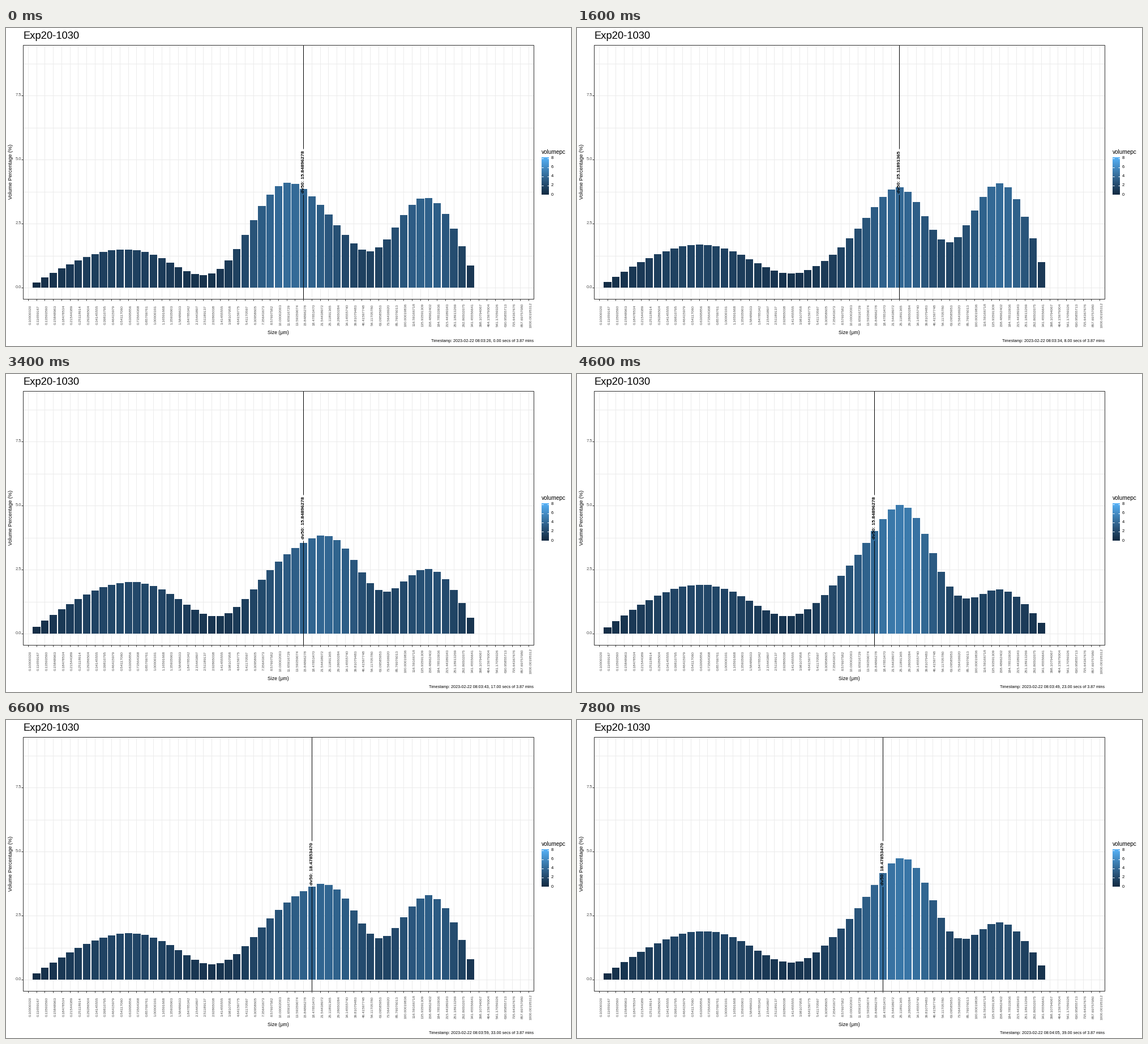
Write a matplotlib script that moves like this. It is 998 by 561 pixels and loops after 8 s.

```python
import numpy as np
import matplotlib.pyplot as plt
from matplotlib.animation import FuncAnimation
from matplotlib.colors import LinearSegmentedColormap
from matplotlib.patches import Rectangle

W, H, DPI = 998, 561, 100
FRAMES, STEP_MS = 40, 200
LEFT, RIGHT, TOP, BOTTOM = 30.5, 932.5, 29.5, 477.5
ZERO_Y, UNIT = 457.5, 45.2          # pixel row of 0 % and pixels per 1 %
PITCH = (RIGHT - LEFT) / 61.2
SCALE_MAX = 8.15
GRID, DARK, GREY = "#EBEBEB", "#333333", "#4D4D4D"
START = 8 * 3600 + 3 * 60 + 26

plt.rcParams["font.family"] = "Liberation Sans"
BLUES = LinearSegmentedColormap.from_list(
    "blues", ["#132B43", "#23496B", "#346B98", "#458EC7", "#56B1F7"])

# Volume percentage at a few size classes, keyed by second
KNOTS = [4, 8, 12, 16, 19, 21, 23, 25, 28, 31, 33, 35, 37, 39, 41, 43, 45, 48, 51]
CURVES = {
    0: [.74, 1.29, 1.48, 1.14, .63, .48, .72, 1.50, 3.17, 4.09,
        3.83, 3.22, 2.43, 1.71, 1.41, 1.88, 2.82, 3.49, 2.29],
    4: [.88, 1.53, 1.76, 1.39, .85, .54, .43, .63, 1.30, 2.00,
        2.36, 2.55, 2.41, 1.97, 1.89, 2.66, 4.00, 4.99, 3.29],
    11: [.74, 1.32, 1.60, 1.41, 1.01, .74, .62, .70, 1.25, 2.50,
         3.72, 4.77, 4.72, 3.38, 1.84, 1.43, 2.24, 3.38, 2.36],
    17: [.94, 1.67, 2.00, 1.72, 1.12, .76, .67, 1.02, 2.09, 3.08,
         3.53, 3.81, 3.64, 2.86, 1.96, 1.63, 2.02, 2.52, 1.69],
    23: [.91, 1.61, 1.90, 1.62, 1.08, .76, .67, .93, 1.86, 3.07,
         4.00, 4.83, 4.91, 3.88, 2.39, 1.47, 1.41, 1.71, 1.14],
    33: [.86, 1.52, 1.80, 1.50, .95, .64, .62, .98, 2.02, 2.99,
         3.45, 3.72, 3.51, 2.69, 1.79, 1.69, 2.43, 3.28, 2.22],
    39: [.88, 1.55, 1.88, 1.64, 1.12, .79, .65, .83, 1.64, 2.77,
         3.69, 4.52, 4.67, 3.78, 2.39, 1.60, 1.74, 2.23, 1.50],
}
BINS = np.arange(1, 54)


def spline(xs, ys, x):
    """Natural cubic spline through the points (xs, ys)."""
    xs, ys = np.asarray(xs, float), np.asarray(ys, float)
    n, h = len(xs), np.diff(xs)
    slope = np.diff(ys) / h
    a, b = np.eye(n), np.zeros(n)
    for i in range(1, n - 1):
        a[i, i - 1:i + 2] = h[i - 1], 2 * (h[i - 1] + h[i]), h[i]
        b[i] = 6 * (slope[i] - slope[i - 1])
    m = np.linalg.solve(a, b)
    k = np.clip(np.searchsorted(xs, x, side="right") - 1, 0, n - 2)
    t = x - xs[k]
    lin = slope[k] - h[k] * (2 * m[k] + m[k + 1]) / 6
    return ys[k] + t * lin + t**2 * m[k] / 2 + t**3 * (m[k + 1] - m[k]) / (6 * h[k])


def full_curve(values):
    # both ends fall to a fixed share of the nearest hump
    ys = [.127 * values[2], *values, .242 * values[17]]
    return spline([1, *KNOTS, 53], ys, BINS)


SECONDS = list(CURVES)
PROFILES = np.array([full_curve(v) for v in CURVES.values()])


def volumes(second):
    return np.array([np.interp(second, SECONDS, col) for col in PROFILES.T])


def class_x(i):
    return LEFT + PITCH * (i + .6)


def value_y(v):
    return ZERO_Y - UNIT * v


def size_label(i):
    return f"{np.float32(0.100000196 * 10 ** (i / 15)):.8f}"


def snap(v):
    return np.floor(v) + .5


fig = plt.figure(figsize=(W / DPI, H / DPI), dpi=DPI, facecolor="white")
ax = fig.add_axes([0, 0, 1, 1])
ax.axis("off")


def text(x, y, s, px, **kw):
    return ax.text(x, y, s, fontsize=px * 72 / DPI, **kw)


def line(xs, ys, color, z=1, width=1):
    return ax.plot(xs, ys, color=color, lw=width * 72 / DPI, zorder=z,
                   solid_capstyle="butt", antialiased=True)[0]


def draw_panel():
    for k in range(8):
        y = snap(value_y(1.25 * k))
        line([LEFT, RIGHT], [y, y], GRID)
        if k % 2 == 0:
            line([LEFT - 3, LEFT], [y, y], DARK)
            text(27.5, y, f"{1.25 * k:.1f}", 7.6, color=GREY, ha="right", va="center")
    for i in range(61):
        x = snap(class_x(i))
        line([x, x], [TOP, BOTTOM], GRID)
        line([x, x], [BOTTOM, BOTTOM + 3], DARK)
        text(class_x(i) + 3.6, 506, size_label(i), 6.5, color=GREY,
             rotation=90, ha="center", va="center")
    ax.add_patch(Rectangle((LEFT, TOP), RIGHT - LEFT, BOTTOM - TOP, fill=False,
                           ec=DARK, lw=72 / DPI, zorder=6))
    text(30.5, 19, "Exp20-1030", 18.4, va="baseline")
    text(480.5, 537.5, "Size (μm)", 8.8, ha="center", va="center")
    text(9, 253.5, "Volume Percentage (%)", 9.2, rotation=90, ha="center", va="center")


def draw_legend():
    x0, x1, low = 946, 959, 294
    high = 228
    ax.imshow(np.linspace(1, 0, 66)[:, None], cmap=BLUES, aspect="auto",
              extent=(x0, x1, low, high), interpolation="nearest", zorder=2)
    text(x0, 219, "volumepc", 10, va="center")
    for v in range(0, 9, 2):
        y = low - (low - high) * v / SCALE_MAX
        row = min(snap(y), low - .5)
        line([x0, x0 + 3], [row, row], "white", 3)
        line([x1 - 3, x1], [row, row], "white", 3)
        text(963, y, str(v), 7.6, va="center")


draw_panel()
draw_legend()
ax.set_xlim(0, W)
ax.set_ylim(H, 0)

bars = []
for i in BINS:
    x0, x1 = (np.round(class_x(i) + s * .45 * PITCH) for s in (-1, 1))
    bars.append(ax.add_patch(Rectangle((x0, ZERO_Y + .5), x1 - x0, 0, lw=0,
                                       antialiased=False, zorder=3)))
upper = line([0, 0], [TOP, 213], "black", 4)
lower = line([0, 0], [294, BOTTOM], "black", 4)
median = text(0, 253.8, "", 8.5, weight="bold", rotation=90,
              ha="center", va="center", zorder=5)
caption = text(932.5, 554, "", 7.15, ha="right", va="baseline")


def update(second):
    vol = volumes(second)
    for bar, v in zip(bars, vol):
        bar.set_height(np.round(value_y(v)) - bar.get_y())
        bar.set_facecolor(BLUES(v / SCALE_MAX))

    share = np.cumsum(vol) / vol.sum()
    mid = BINS[np.argmax(share >= .503)]
    x = snap(class_x(mid))
    upper.set_xdata([x, x])
    lower.set_xdata([x, x])
    median.set_text("dv50: " + size_label(mid))
    median.set_x(x)

    now = START + second
    clock = f"{now // 3600:02d}:{now // 60 % 60:02d}:{now % 60:02d}"
    caption.set_text(f"Timestamp: 2023-02-22 {clock}, {second:.2f} secs of 3.87 mins")
    return [*bars, upper, lower, median, caption]


anim = FuncAnimation(fig, update, frames=FRAMES, interval=STEP_MS,
                     init_func=lambda: update(0), repeat=True, repeat_delay=0)
plt.show()
```
